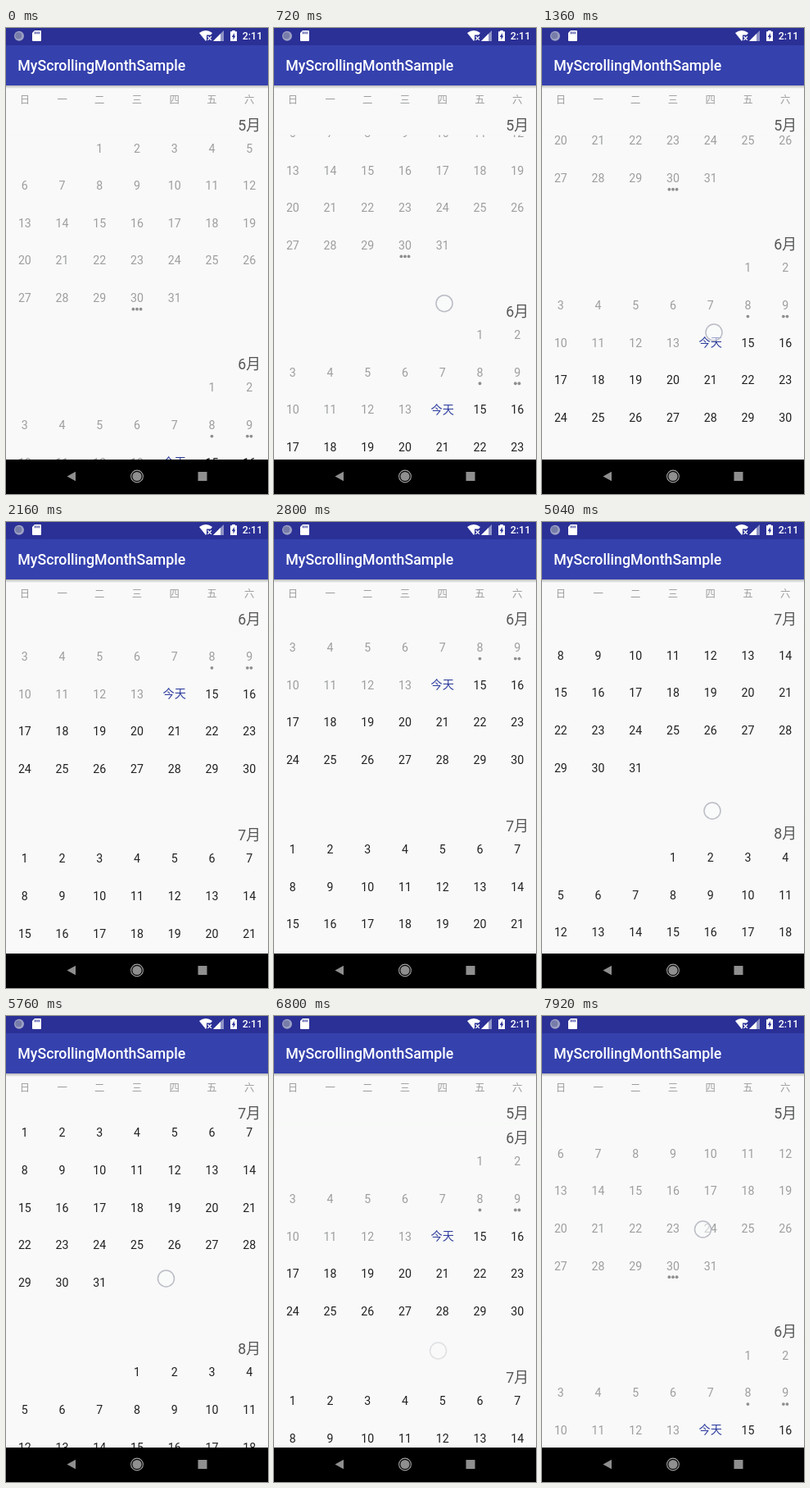
An HTML page with a canvas for the animation above (8000 ms loop, 320 by 568 pixels).

```html
<!DOCTYPE html>
<html lang="zh-CN">
<head>
<meta charset="utf-8">
<title>Vertical calendar</title>
<style>
html, body { margin: 0; width: 100%; height: 100%; overflow: hidden; background: #000; }
canvas { display: block; width: 320px; height: 568px; }
</style>
</head>
<body>
<canvas id="stage"></canvas>
<script>
const W = 320, H = 568, LOOP = 8000, STEP = 80;
const FONT = 'Roboto, "Noto Sans CJK SC", "Noto Sans CJK", sans-serif';
const PAPER = '#f8f9f8', COLUMN = W / 7, ROW = 45.65;
const BAR_BOTTOM = 70, LIST_TOP = 103, LIST_BOTTOM = 526;
const STICKY_Y = 118.3, FIRST_HEADER = 117.3, HEADER_HEIGHT = 29, MONTH_HEIGHT = 291.8;
const MONTHS = [5, 6, 7, 8], YEAR = 2018, TODAY = new Date(YEAR, 5, 14);
const EVENTS = { '5-30': 3, '6-8': 1, '6-9': 2 };

// Finger drags; after each one the list flings on to the next scroll offset.
const SWIPES = [
  { start: 480, end: 760, x: 208, from: 400, to: 325, scroll: 0, rest: 1280 },
  { start: 1280, end: 1600, x: 210, from: 408, to: 260, scroll: 109, rest: 2800 },
  { start: 2960, end: 3260, x: 208, from: 400, to: 340, scroll: 331, rest: 3920 },
  { start: 3920, end: 4320, x: 208, from: 400, to: 260, scroll: 411.7, rest: 4640 },
  { start: 4800, end: 5100, x: 208, from: 400, to: 340, scroll: 565, rest: 5600 },
  { start: 5600, end: 5920, x: 195.5, from: 250, to: 390, scroll: 657.7, rest: 6460 },
  { start: 6460, end: 6740, x: 200.5, from: 256, to: 408, scroll: 442, rest: 7140 },
  { start: 7140, end: 7440, x: 198, from: 256, to: 408, scroll: 215, rest: 7860 },
  { start: 7860, end: 7980, x: 196.5, from: 256, to: 264, scroll: 28.5, rest: LOOP }
];

const canvas = document.getElementById('stage');
const ctx = canvas.getContext('2d');
const ratio = window.devicePixelRatio || 1;
canvas.width = W * ratio;
canvas.height = H * ratio;
ctx.scale(ratio, ratio);

const clamp = v => Math.max(0, Math.min(1, v));

function rect(x, y, w, h, color) {
  ctx.fillStyle = color;
  ctx.fillRect(x, y, w, h);
}

function disc(x, y, r, color) {
  ctx.fillStyle = color;
  ctx.beginPath();
  ctx.arc(x, y, r, 0, Math.PI * 2);
  ctx.fill();
}

function ring(x, y, r, width, color) {
  ctx.strokeStyle = color;
  ctx.lineWidth = width;
  ctx.beginPath();
  ctx.arc(x, y, r, 0, Math.PI * 2);
  ctx.stroke();
}

function shape(path, color) {
  ctx.fillStyle = color;
  ctx.fill(new Path2D(path));
}

function text(value, x, y, size, color, align = 'center', weight = 400) {
  ctx.font = `${weight} ${size}px ${FONT}`;
  ctx.fillStyle = color;
  ctx.textAlign = align;
  ctx.fillText(value, x, y);
}

function motionAt(time) {
  const index = SWIPES.findLastIndex(s => s.start <= time);
  if (index < 0) return { scroll: 0, alpha: 0 };
  const s = SWIPES[index];
  const drag = clamp((time - s.start) / (s.end - s.start));
  const y = s.from + (s.to - s.from) * drag;
  let scroll = s.scroll + s.from - y;
  if (time > s.end && SWIPES[index + 1]) {
    const left = 1 - clamp((time - s.end) / (s.rest - s.end));
    const goal = SWIPES[index + 1].scroll;
    scroll = goal + (scroll - goal) * left ** 3;
  }
  return { scroll, x: s.x, y, alpha: 1 - clamp((time - s.end) / 100) };
}

function drawDays(month, firstRowY) {
  const offset = new Date(YEAR, month - 1, 1).getDay();
  const count = new Date(YEAR, month, 0).getDate();
  for (let day = 1; day <= count; day++) {
    const cell = day - 1 + offset;
    const x = COLUMN * (cell % 7 + 0.5);
    const y = firstRowY + ROW * Math.floor(cell / 7);
    const delta = new Date(YEAR, month - 1, day) - TODAY;
    if (delta === 0) text('今天', x, y + 4.5, 14.2, '#303f9f');
    else text(day, x, y + 5.2, 14.2, delta < 0 ? '#9d9e9e' : '#212121');
    const dots = EVENTS[`${month}-${day}`] || 0;
    for (let i = 0; i < dots; i++) {
      disc(x + (i - (dots - 1) / 2) * 4.6, y + 13.8, 1.9, '#8e8f8f');
    }
  }
}

function drawList(scroll) {
  const tops = MONTHS.map((_, i) => FIRST_HEADER + MONTH_HEIGHT * i - scroll);
  MONTHS.forEach((month, i) => drawDays(month, tops[i] + 29));
  MONTHS.forEach((month, i) => {
    const limit = (tops[i + 1] ?? Infinity) - HEADER_HEIGHT;
    const y = Math.min(Math.max(tops[i], STICKY_Y), limit);
    rect(0, y - 15.3, W, HEADER_HEIGHT - 1.5, PAPER);
    text(month + '月', 311, y + 6.7, 17.8, '#555656', 'right');
  });
}

function drawStatusBar() {
  rect(0, 0, W, 21, '#2b3096');
  disc(16, 9.7, 6, '#9da1c4');
  disc(15.3, 9.2, 4, '#777da9');
  shape('M35 3H42Q43 3 43 4V15Q43 16 42 16H33Q32 16 32 15V6Z', '#fff');
  for (const x of [35, 37.3, 39.6]) rect(x, 4.5, 1.2, 2.8, '#2b3096');
  shape('M236 6Q244 0 252 6L250 8.6H245V14.6L244 16Z', '#fff');
  ctx.strokeStyle = '#fff';
  ctx.lineWidth = 1.3;
  ctx.stroke(new Path2D('M246.3 10.3l4.6 4.6m0-4.6l-4.6 4.6'));
  shape('M266 3V16H253Z', '#8f93c6');
  shape('M262 7V16H253Z', '#fff');
  shape('M276.2 3H279.8V4.3H282V16H274V4.3H276.2Z', '#fff');
  shape('M278.8 6L275.8 11H277.5V14.6L280.3 9.5H278.8Z', '#2b3096');
  text('2:11', 313.2, 14.3, 12.4, '#fff', 'right', 500);
}

function drawChrome() {
  rect(0, BAR_BOTTOM, W, LIST_TOP - BAR_BOTTOM, PAPER);
  [...'日一二三四五六'].forEach((name, i) =>
    text(name, COLUMN * (i + 0.5), 92, 12.4, '#9d9e9e'));
  const shadow = ctx.createLinearGradient(0, BAR_BOTTOM, 0, BAR_BOTTOM + 4);
  shadow.addColorStop(0, 'rgba(0,0,0,.26)');
  shadow.addColorStop(1, 'rgba(0,0,0,0)');
  rect(0, BAR_BOTTOM, W, 4, shadow);
  rect(0, 20, W, BAR_BOTTOM - 20, '#3541ad');
  text('MyScrollingMonthSample', 14.2, 52, 17.78, '#fff', 'left', 500);
  drawStatusBar();

  rect(0, LIST_BOTTOM, W, H - LIST_BOTTOM, '#000');
  shape('M74.5 546.5L85 540.7V552.3Z', '#8f8f8f');
  disc(160, 546.5, 5.6, '#8f8f8f');
  ring(160, 546.5, 7.4, 1.1, '#a2a2a2');
  rect(234.5, 541, 11, 11, '#8f8f8f');
}

function drawTouch({ x, y, alpha }) {
  if (!alpha) return;
  ctx.globalAlpha = alpha;
  disc(x, y, 10, 'rgba(250,251,251,.55)');
  ring(x, y, 10, 1.5, '#bbbcc6');
  ctx.globalAlpha = 1;
}

function draw(now) {
  const motion = motionAt(Math.floor(now % LOOP / STEP) * STEP);
  rect(0, 0, W, H, PAPER);
  drawList(motion.scroll);
  drawChrome();
  drawTouch(motion);
  requestAnimationFrame(draw);
}
requestAnimationFrame(draw);
</script>
</body>
</html>
```
